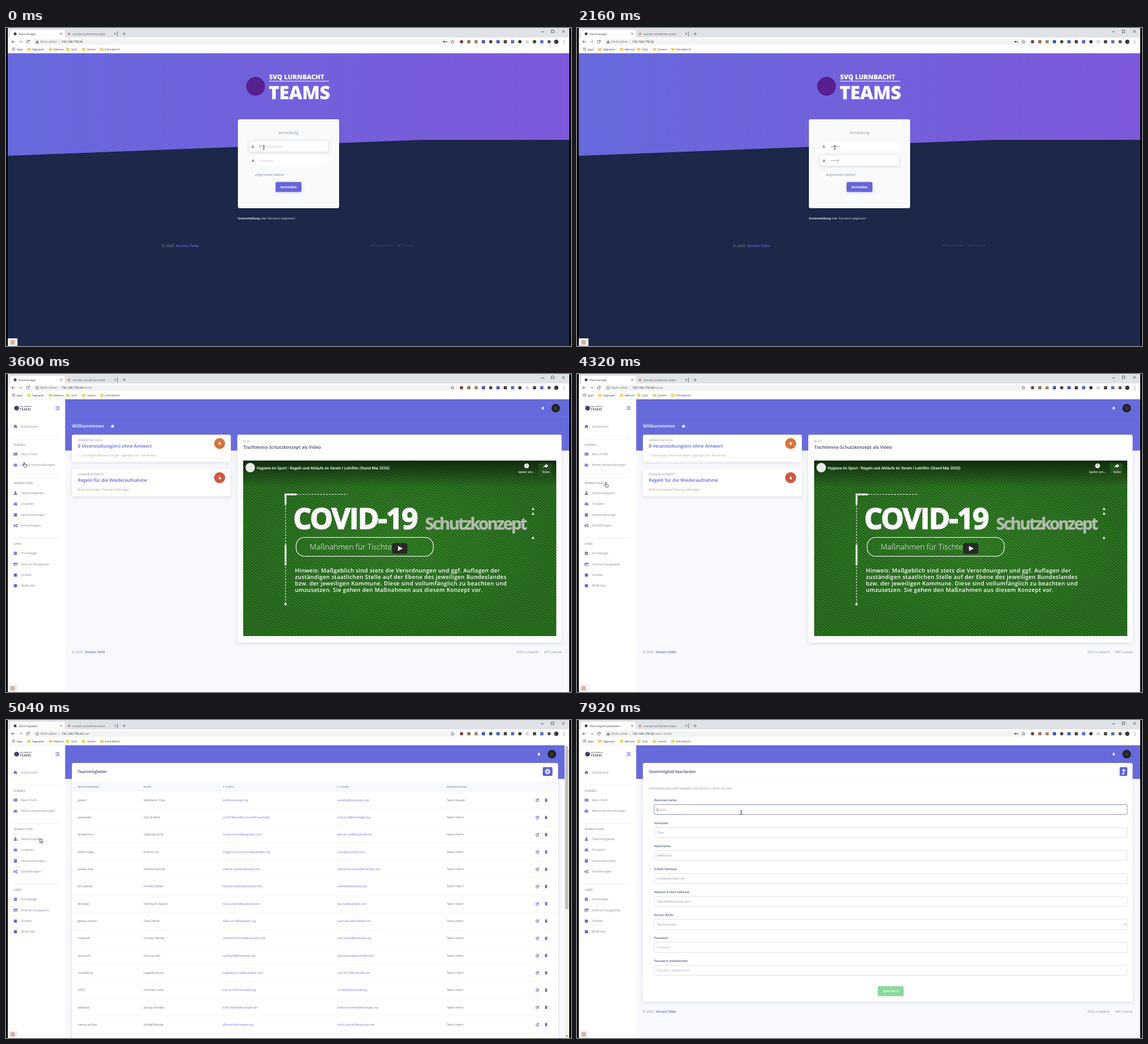
An HTML page that plays this animation: 960x540 px, repeating every 8000 ms.

```html
<!DOCTYPE html>
<html lang="de">
<head>
<meta charset="utf-8">
<title>Teammanager</title>
<style>
html, body { margin: 0; height: 100%; overflow: hidden; background: #000; }
svg { display: block; width: 960px; height: 540px; font-family: "Open Sans", "Noto Sans", sans-serif; text-rendering: geometricPrecision; }
</style>
</head>
<body>
<svg viewBox="0 0 960 540">
  <defs>
    <linearGradient id="sky"><stop stop-color="#6769dd"/><stop offset="1" stop-color="#7d58da"/></linearGradient>
    <linearGradient id="shade" x2="0" y2="1"><stop stop-opacity=".6"/><stop offset="1" stop-opacity="0"/></linearGradient>
    <radialGradient id="lawn"><stop stop-color="#3c8c2d"/><stop offset="1" stop-color="#307724"/></radialGradient>
    <radialGradient id="photo"><stop stop-color="#3c3a34"/><stop offset="1" stop-color="#17181a"/></radialGradient>
    <pattern id="hatch" width="3.6" height="3.6" patternUnits="userSpaceOnUse" patternTransform="rotate(-50)"><path d="M1 0V3.6" stroke="#174d13" stroke-width="1.5" opacity=".85"/></pattern>
    <filter id="shadow" x="-20%" y="-20%" width="140%" height="140%"><feDropShadow dx="0" dy="1.5" stdDeviation="3" flood-color="#8898aa" flood-opacity=".3"/></filter>
  </defs>
  <g id="view"></g>
</svg>
<script>
const STEP = 360, LOOP = 8000;
const PURPLE = '#5e64d9', BAR = '#666adb', GRAY = '#7f8b9e', INK = '#3d4868', PALE = '#a4adba';
const CLUB = 'SVQ Lurnbacht', OWNER = 'Norwin Telbe';

const ICONS = {
  home: 'M-3.3 0L0-3 3.3 0H2.4V3H.7V1H-.7V3H-2.4V0Z',
  card: 'M-3.3-2.3h6.6v4.6h-6.6zM-2.4-1h1.6v1.8h-1.6zM.3-1h2v.6h-2zM.3.4h2v.6h-2z',
  user: 'M-1.4-1.5a1.4 1.4 0 1 1 2.8 0a1.4 1.4 0 1 1-2.8 0M-2.6 3v-1.2q0-1.5 1.5-1.5h2.2q1.5 0 1.5 1.5V3z',
  group: 'M-3.1-1a1 1 0 1 1 2 0a1 1 0 1 1-2 0M1.1-1a1 1 0 1 1 2 0a1 1 0 1 1-2 0M-1.2-1a1.2 1.2 0 1 1 2.4 0a1.2 1.2 0 1 1-2.4 0M-3.6 2.2q0-1.7 1.2-1.7h4.8q1.2 0 1.2 1.7z',
  date: 'M-2.6-2.2h1v-.9h.8v.9h1.6v-.9h.8v.9h1v5.1h-5.2zM-2-.6v.5h4v-.5z',
  cogs: 'M-3.4 0a2 2 0 1 1 4 0a2 2 0 1 1-4 0M-2.2 0a.8.8 0 1 0 1.6 0a.8.8 0 1 0-1.6 0M1-1.6a1.2 1.2 0 1 1 2.4 0a1.2 1.2 0 1 1-2.4 0M1 1.6a1.2 1.2 0 1 1 2.4 0a1.2 1.2 0 1 1-2.4 0',
  globe: 'M-2.9 0a2.9 2.9 0 1 1 5.8 0a2.9 2.9 0 1 1-5.8 0M-2.9-.2h5.8v.4h-5.8zM-.2-2.9h.4v5.8h-.4z',
  images: 'M-2.4-2.5h5.8v4h-5.8zM-3.4-1.3h.6v3.2h5v.6h-5.6zM-1.6.9l1.3-1.6 .8.8 1-1.3 1.3 2.1z',
  square: 'M-2.6-2.6h5.2v5.2h-5.2z',
  bell: 'M-2.4 1.6q.8-.8.8-2.4a1.6 1.6 0 0 1 3.2 0q0 1.6.8 2.4zM-.8 2h1.6a.8.8 0 0 1-1.6 0z',
  point: 'M-1-3h1v2.6l2 .4q.6.2.5.8l-.3 2h-2.7l-1.7-2 .5-.5.7.5z',
  edit: 'M-2.6-2h3v.7h-2.3v3.6h3.6V.5h.7V3h-5zM2-2.8l1 1-2.9 2.9-1.3.3.3-1.3z',
  trash: 'M-2.3-2.4h1.4v-.5h1.8v.5h1.4v.7h-4.6zM-1.9-1.3h3.8l-.3 4.2h-3.2z',
  lock: 'M-1.8-.3h3.6v2.8h-3.6zM-1.2-.3v-1a1.2 1.2 0 0 1 2.4 0v1h-.6v-1a.6.6 0 0 0-1.2 0v1z',
  star: 'M0-2.8L.8-.9 2.8-.8 1.3.6 1.8 2.6 0 1.5-1.8 2.6-1.3.6-2.8-.8-.8-.9Z'
};

const PEOPLE = `gastel|Melbrecht Tilsa|mtil@example.org|velumb@example.com
zpolander|Dorvik Nela|orin47@sandkornverleih.example|tamsin38@example.org
qlindemoor|Salbrook Jorid|torvald.emis@example.com|pernel.osk@example.net
wolm.nadja|Krumm Isa|lindgard.ostermohr@example.org|vrau@example.com
tessen.orla|Dahlke Runhild|undine.sahl@example.com|wilbrandt.osane@example.net
jorn.pelzer|Ehmke Torben|kastner.wibke@example.net|uwe58@example.org
drosalie|Fennbach Alwine|nils.rumohr@example.com|pkurz@example.com
gesine.tolmar|Gahl Ottilie|silke.varn@example.org|ludmar62@example.net
mopitzel|Gronau Wenke|valentin.drohm@example.com|renz.olufa@example.org
tjorven31|Gronau Veit|samtig44@example.org|wpolkenau@example.com
vsanderup|Hagedal Nuria|hagedal.nuria@example.com|ostrun27@example.net
ulf73|Hinzmer Lotte|jule.stroh@example.org|nora52@example.org
wiebe26|Jessup Annelie|kolb.merle@example.net|tabea.zimmeln@example.org
svenja.pohlau|Kordell Martje|yfinster@example.org|mohr.jannik@example.net`.split('\n').map(row => row.split('|'));
const [LAST, FIRST] = PEOPLE[0][1].split(' ');

const text = (x, y, s, size = 5.4, fill = GRAY, weight = 400, more = '') =>
  `<text x="${x}" y="${y + size * .36}" font-size="${size}" fill="${fill}" font-weight="${weight}" ${more}>${s}</text>`;
const MID = 'text-anchor="middle"', END = 'text-anchor="end"';
const rect = (x, y, w, h, fill, r = 0, more = '') =>
  `<rect x="${x}" y="${y}" width="${w}" height="${h}" rx="${r}" fill="${fill}" ${more}/>`;
const dot = (x, y, r, fill) => `<circle cx="${x}" cy="${y}" r="${r}" fill="${fill}"/>`;
const line = (d, stroke, width = .7, more = '') =>
  `<path d="${d}" fill="none" stroke="${stroke}" stroke-width="${width}" ${more}/>`;
const icon = (name, x, y, fill = PURPLE, size = 1) =>
  `<path d="${ICONS[name]}" fill="${fill}" fill-rule="evenodd" transform="translate(${x} ${y}) scale(${size})"/>`;
const panel = (x, y, w, h) => rect(x, y, w, h, '#fff', 3, 'filter="url(#shadow)"');

function browser({ title, path, loading, form }) {
  let s = rect(3, 0, 954, 17, '#dfe2e7') + rect(3, 16, 954, 27, '#fff') + rect(7, 3, 93, 15, '#fff', 3);
  s += dot(15.5, 10, 2.4, '#393d48') + text(21, 10, title, 4.5, '#333') + line('M92 8l3.4 3.4m0-3.4L92 11.4', '#444');
  s += dot(107, 10, 2, '#d68a63') + text(113, 10, 'monitor aufnehmen anleit', 4.5, '#555');
  s += line('M184 8l3.4 3.4m0-3.4L184 11.4M189.5 6v8M198 10h5.4M200.7 7.3v5.4', '#555');
  s += line('M909 6.5h5M926.5 3.5h4.4v4.4h-4.4zM945 3.6l4.4 4.4m0-4.4L945 8', '#333');
  s += line('M15 23.3H9.8M12 21l-2.4 2.3L12 25.6', '#444', .8) + line('M22 23.3h5.2M25 21l2.4 2.3L25 25.6', '#999', .8);
  s += loading ? line('M35 21l4.4 4.4m0-4.4L35 25.4', '#444', .8)
               : line('M39.2 22a2.4 2.4 0 1 0 .2 2M39.6 20.4V22.4H37.6', '#444', .8);
  s += rect(46, 18.5, 718, 10, '#f1f3f4', 5);
  s += form ? '<path d="M50 25.8L53 20.6 56 25.8Z" fill="#765"/>' + line('M53 22.3v1.6m0 .5v.6', '#fff', .6)
            : line('M55.5 23.3a2.5 2.5 0 1 0-5 0a2.5 2.5 0 1 0 5 0M53 22.8v2m0-3v.5', '#555', .6);
  s += text(58, 23.4, 'Nicht sicher', 5.2, form ? '#765' : '#666') + line('M90.5 20.5v6', '#bbb', .5);
  s += text(94, 23.4, `192.168.178.34<tspan fill="#777">${path}</tspan>`, 5.1, '#222');
  if (form) s += dot(744.5, 23.3, 1.4, '#444') + line('M745 23.3h4v1.4', '#444', .9);
  s += `<path d="${ICONS.star}" transform="translate(758.5 23.3)" fill="none" stroke="#555" stroke-width=".6"/>`;
  ['#8b3434', '#94714c', '#a98364', '#3956bd', '#444', '#405bc0', '#444', '#4a6cc5', '#333', '#d5d5d5', '#444', '#5273c7', '#555']
    .forEach((c, i) => { const x = 774 + i * 12.4; s += i % 4 ? rect(x - 2.7, 20.6, 5.4, 5.4, c) : dot(x, 23.3, 2.8, c); });
  s += dot(935, 23.3, 3.6, '#383838') + [21, 23.3, 25.6].map(y => dot(948, y, .6, '#444')).join('');
  for (let i = 0; i < 9; i++) s += rect(10 + i % 3 * 1.9, 33.2 + (i / 3 | 0) * 1.9, 1.3, 1.3, ['#d66', '#6a6', '#66c'][i % 3]);
  s += text(18, 36, 'Apps', 4.5, '#333');
  [[36, 44, 'Tagesplan'], [73, 81, 'Melvora'], [102, 111, 'QLN'], [129, 138, 'Garten'], [160, 168, 'Schreibtisch']]
    .forEach(([x, tx, name]) => s += `<path d="M${x} 33.4h2.2l.7.8h3v4.3h-5.9z" fill="#f2cf66"/>` + text(tx, 36, name, 4.5, '#333'));
  return s + line('M3 42.6H957', '#d8dade', .5);
}

function login(k) {
  const onUser = k < 3, name = 'admin'.slice(0, k * 2), dots = Math.max(0, Math.min(6, (k - 3) * 2));
  const field = (y, focus) => rect(413, y, 134, 18, '#fff', 2, focus ? 'filter="url(#shadow)" stroke="#e3e7ee" stroke-width=".5"' : 'stroke="#edf0f4" stroke-width=".5"');
  let s = rect(3, 43, 954, 497, '#1c2749') + '<path d="M3 43H957V190H706L3 217Z" fill="url(#sky)"/>';
  s += dot(424, 99, 16, '#58208f');
  s += text(447, 83.5, CLUB.toUpperCase(), 11, '#fff', 800) + line('M447 90.3H549', '#fff', 1);
  s += text(446, 109.5, 'TEAMS', 31.5, '#fff', 800, 'letter-spacing="-.6"');
  s += rect(394, 155, 172, 151, '#f8fafb', 3) + text(480, 178, 'Anmeldung', 6.3, GRAY, 400, MID);
  s += field(192, onUser) + field(216, !onUser) + icon('user', 419.3, 201, '#858b96', .8) + icon('lock', 419.7, 225, '#737a86', .9);
  s += text(431, 201, name || 'Benutzername', 5.4, name ? GRAY : '#b5bbc4');
  if (!dots) s += text(431, 225, 'Passwort', 5.4, '#b5bbc4');
  for (let i = 0; i < dots; i++) s += dot(432 + i * 2.15, 225, .65, '#687386');
  if (onUser) s += line(`M${431 + name.length * 3.1} 198v6`, '#555', .5);
  else if (k < 7) s += line(`M${431.5 + dots * 2.15} 222v6`, '#555', .5);
  s += rect(413, 246, 6.5, 6, '#fff', 1, 'stroke="#e7eaee" stroke-width=".5"') + text(423, 249, 'angemeldet bleiben');
  s += rect(458, 261.5, 44, 17, '#6865d8', 2, 'filter="url(#shadow)"') + text(480, 270, 'Anmelden', 5.4, '#fff', 700, MID);
  s += text(394, 323, '<tspan font-weight="700">Erstanmeldung</tspan> oder Passwort vergessen?', 4.9, '#e7e9f0');
  s += text(265, 369.5, '© 2020', 6.1, '#8791a9') + text(289, 369.5, OWNER, 6.1, '#6d63dc', 600);
  return s + text(656, 369.5, CLUB, 5.2, '#46506f', 400, END) + text(665, 369.5, 'MIT License', 5.2, '#46506f');
}

function shell(barEnd, shift = 0) {
  let s = rect(3, 43, 954, 497, '#f8f9fd') + rect(100, 43, 857, barEnd - 43, BAR) + line('M100 72.5H957', '#7478df', .5);
  s += rect(3, 43, 97.5, 497, '#fff') + dot(18, 58, 4, '#4a3f6e');
  s += text(23, 54.7, CLUB.toUpperCase(), 2.5, '#555', 700) + text(23, 60, 'TEAMS', 6, '#444c5c', 600);
  s += line('M84 55.7h7M86 58h5M84 60.3h7', PURPLE, 1.1);
  const nav = [[89, 'home', 'Dashboard'], [136, 'card', 'Mein Profil'], [154.5, 'group', 'Meine Veranstaltungen'],
    [202, 'user', 'Teammitglieder'], [220.5, 'group', 'Gruppen'], [239, 'date', 'Veranstaltungen'], [257.5, 'cogs', 'Einstellungen'],
    [304.5, 'globe', 'Homepage'], [323, 'images', 'Interne Fotogalerie'], [341.5, 'square', 'Zirkelei'], [359.5, 'square', 'Bildfunke']];
  nav.forEach(([y, name, label]) => s += icon(name, 16, y) + text(25.5, y, label));
  [[120, 'EIGENES'], [185.5, 'VERWALTUNG'], [288, 'LINKS']].forEach(([y, label]) =>
    s += line(`M13 ${y - 9.8}H91`, '#e3e6eb') + text(13, y, label, 5, '#697386'));
  return s + icon('bell', 912 - shift, 58, '#fff') + dot(934 - shift, 58, 7.2, 'url(#photo)');
}

const footer = y => text(112, y, '© 2020') + text(134, y, OWNER, 5.4, PURPLE, 600)
  + text(905, y, CLUB, 5.4, GRAY, 400, END) + text(944, y, 'MIT License', 5.4, GRAY, 400, END);

function video() {
  const white = '#fff';
  let s = rect(403, 147, 532, 298, 'url(#lawn)') + rect(403, 147, 532, 298, 'url(#hatch)') + rect(403, 147, 532, 45, 'url(#shade)');
  s += dot(415, 159, 8, '#e9ece8') + rect(905, 152, 22, 22, '#244f1c');
  s += text(426, 159.2, 'Hygiene im Sport - Regeln und Abläufe im Verein I Lehrfilm (Stand Mai 2020)', 6.6, white, 500, 'font-family="Roboto, sans-serif"');
  s += dot(884.5, 156, 4, white) + line('M884.5 153.5v2.7l1.8 1', '#2b651c', .8) + text(870, 166, 'Später ans...', 4.8, white, 600);
  s += '<path d="M913 159.5q.5-4.5 4-4.5V152.5L921.5 156 917 159.5V157.2Q914.5 157 913 159.5Z" fill="#fff"/>' + text(917.5, 166, 'Teilen', 4.8, white, 600, MID);
  s += line('M475 222V204.5H494', white, 3) + line('M475 290V325', white, 3);
  s += line('M494 204.5H580M475 222V390', white, 1, 'stroke-dasharray="3 2"') + dot(475, 391, 2, white);
  s += text(488, 245, 'COVID-19', 49, white, 700, 'letter-spacing="-1.8" stroke="#fff" stroke-width="1.6"');
  s += text(712, 254, 'Schutzkonzept', 28, '#b3bbae', 700, 'letter-spacing="-2.6" stroke="#b3bbae" stroke-width=".4"');
  s += rect(493, 277.5, 233, 32, 'none', 14, 'stroke="#fff" stroke-width="1.1"') + text(516, 293, 'Maßnahmen für Tischtennis', 13.1, white, 300);
  s += rect(656, 287, 26, 18.5, '#262a25', 4) + '<path d="M666 292L674 296.3 666 300.6Z" fill="#fff"/>';
  ['Hinweis: Maßgeblich sind stets die Verordnungen und ggf. Auflagen der',
   'zuständigen staatlichen Stelle auf der Ebene des jeweiligen Bundeslandes',
   'bzw. der jeweiligen Kommune. Diese sind vollumfänglich zu beachten und',
   'umzusetzen. Sie gehen den Maßnahmen aus diesem Konzept vor.']
    .forEach((row, i) => s += text(491, 333.5 + i * 11.1, row, 9.5, white, 600, 'letter-spacing=".32"'));
  [229, 237, 278].forEach(y => s += `<path d="M893 ${y + 2}h5l-2.5-4.5z" fill="#e8eee6"/>`);
  return s;
}

function home() {
  const card = (y, label, title, note, name, color, noteColor) => panel(112, y, 270, 46.5)
    + text(122, y + 9.5, label, 5, '#7d899b') + text(122, y + 19, title, 7.7, PURPLE, 600)
    + text(122, y + 35.5, note, 5.1, noteColor) + dot(363, y + 15, 9.3, color) + icon(name, 363, y + 15, '#fff');
  return shell(130) + text(112, 88, 'Willkommmen', 7.8, '#fff', 600) + icon('home', 181, 88.5, '#fff', .9)
    + card(103, 'VERANSTALTUNG', `<tspan fill="${INK}">0</tspan> Veranstaltung(en) ohne Antwort`, '1&#160; zukünftige Veranstaltungen zugesagt (inkl. Warteliste)', 'bell', '#d6743a', PALE)
    + card(161, 'HYGIENE-KONZEPT', 'Regeln für die Wiederaufnahme', 'Bitte zum ersten Training mitbringen', 'point', '#d0563d', '#bb8973')
    + panel(393, 103, 551, 353) + text(403, 114, 'KLSV', 5, '#7d899b') + text(403, 124, 'Tischtennis-Schutzkonzept als Video', 7.6, INK, 600)
    + video() + footer(472);
}

function list(hover) {
  let s = shell(100, 6.5) + panel(112, 73, 826, 480) + text(122, 88, 'Teammitglieder', 6.6, INK, 600);
  s += rect(912, 80, 16.5, 15, PURPLE, 2) + dot(920.3, 87.5, 4.2, '#fff') + line('M917.8 87.5h5M920.3 85v5', PURPLE, 1.2);
  s += rect(112, 106, 826, 15, '#f7f9fc') + line('M112 106H938M112 121H938', '#e6eaf0', .5);
  const cols = [122, 234, 368, 563, 749];
  ['BENUTZERNAME', 'NAME', '1. E-MAIL', '2. E-MAIL', 'BERECHTIGUNG']
    .forEach((h, i) => s += text(cols[i], 113.5, h, 4.2, '#7b879b', 600, 'letter-spacing=".2"'));
  PEOPLE.forEach((person, i) => {
    const y = 136 + i * 29.32;
    [...person, i ? 'Team Intern' : 'Team Aussen'].forEach((cell, c) =>
      s += text(cols[c], y, cell, 5.1, c == 2 || c == 3 ? '#6d71da' : '#626e88'));
    s += icon('edit', 903, y) + icon('trash', 917.7, y) + line(`M112 ${y + 14.6}H938`, '#e6eaf0', .5);
  });
  if (hover) s += rect(887, 118, 33, 11.5, '#000', 2) + '<path d="M900.5 129h5l-2.5 2.7z"/>' + text(903.5, 123.7, 'bearbeiten', 5.3, '#fff', 400, MID);
  s += rect(949, 43, 8, 497, '#f1f1f1') + rect(950, 49, 6, 272, '#c1c1c1');
  return s + '<path d="M951 47.5h4l-2-2.5zM951 535.5h4l-2 2.5z" fill="#666"/>';
}

function edit() {
  let s = shell(100) + panel(112, 73, 832, 405) + text(122, 88, 'Teammitglied bearbeiten', 6.6, INK, 600);
  s += rect(922, 80, 13, 15, PURPLE, 2) + line('M925.5 91.5H929V84.5M926.5 86.5L929 84 931.5 86.5', '#fff', 1.3);
  s += line('M112 102.5H944', '#edf0f4', .5);
  s += text(122, 116.5, 'INFORMATIONEN ÜBER TEAMMITGLIED (ERSTELLT AM 01.08.2020)', 4.6, '#7d899b');
  const [user, , mail, mail2] = PEOPLE[0];
  [['Benutzername', user], ['Vorname', FIRST], ['Nachname', LAST], ['E-Mail-Adresse', mail], ['Weitere E-Mail-Adresse', mail2],
   ['Nutzer-Rolle', 'Team Aussen'], ['Passwort', 'Passwort'], ['Passwort wiederholen', 'Passwort wiederholen']]
    .forEach(([label, value], i) => {
      const y = 136 + i * 39;
      s += text(131, y, label, 5.4, '#525f7f', 600);
      s += rect(131, y + 7.5, 804, 17, '#fff', 2, `stroke="${i ? '#d8dde4' : '#7478c4'}" stroke-width=".8"`);
      s += text(136, y + 16.2, value, 5.4, i > 5 ? PALE : '#8b97a8');
    });
  s += line('M136 149v6.5', '#333', .5) + line('M929.5 346.3l1.5 1.5 1.5-1.5', '#444', .8);
  s += rect(511, 452, 44, 17, '#8bd9a0', 2) + text(533, 460.5, 'Speichern', 5.4, '#fff', 600, MID);
  return s + footer(495.5);
}

// Pointer stops: step, x, y
const STOPS = [[0, 438, 203], [6, 438, 203], [9, 493, 273], [10, 32, 154], [13, 59, 205], [14, 59, 205], [17, 906, 139], [18, 906, 139], [22, 279, 157]];
function pointer(k) {
  const i = Math.max(1, STOPS.findIndex(stop => stop[0] >= k));
  const [a, ax, ay] = STOPS[i - 1], [b, bx, by] = STOPS[i], p = (k - a) / (b - a);
  const at = `transform="translate(${ax + (bx - ax) * p} ${ay + (by - ay) * p})"`;
  if (k < 7 || k == 22) return line('M-1.5-3h3M0-3V3M-1.5 3h3', '#222', .8, at);
  const hand = k >= 9 && k <= 13 || k == 17 || k == 18;
  const d = hand ? 'M-1.5-3.5q.8-.8 1.4 0V-.8l2.6.6q1 .3.9 1.2l-.6 3h-3.6l-2.6-3.2q.2-.8 1-.5l.9.6z'
                 : 'M-1.5-4v7.5l1.7-1.6 1.2 2.7 1.1-.5-1.2-2.6h2.4z';
  return `<path d="${d}" fill="#fff" stroke="#222" stroke-width=".7" ${at}/>`;
}

function draw(k) {
  const tab = {
    title: k < 13 ? 'Teammanager' : k < 18 ? 'Teammitglieder' : 'Teammitglied bearbeiten',
    path: k < 10 ? '' : k < 13 ? '/home' : k < 18 ? '/user' : '/user/13/edit',
    loading: k == 13 || k == 18,
    form: k < 10 || k > 18
  };
  const page = k < 10 ? login(k) : k < 14 ? home() : k < 19 ? list(k > 16) : edit();
  const badge = rect(3, 527, 16.5, 13, '#f1f1f1') + rect(7.5, 530, 7.5, 7.5, '#d8b3a5');
  document.getElementById('view').innerHTML = page + browser(tab) + badge + pointer(k)
    + rect(0, 0, 3, 540, '#000') + rect(957, 0, 3, 540, '#000');
}

const start = performance.now();
let shown = -1;
function tick() {
  const k = Math.floor((performance.now() - start) % LOOP / STEP);
  if (k != shown) draw(shown = k);
  requestAnimationFrame(tick);
}
tick();
</script>
</body>
</html>
```
